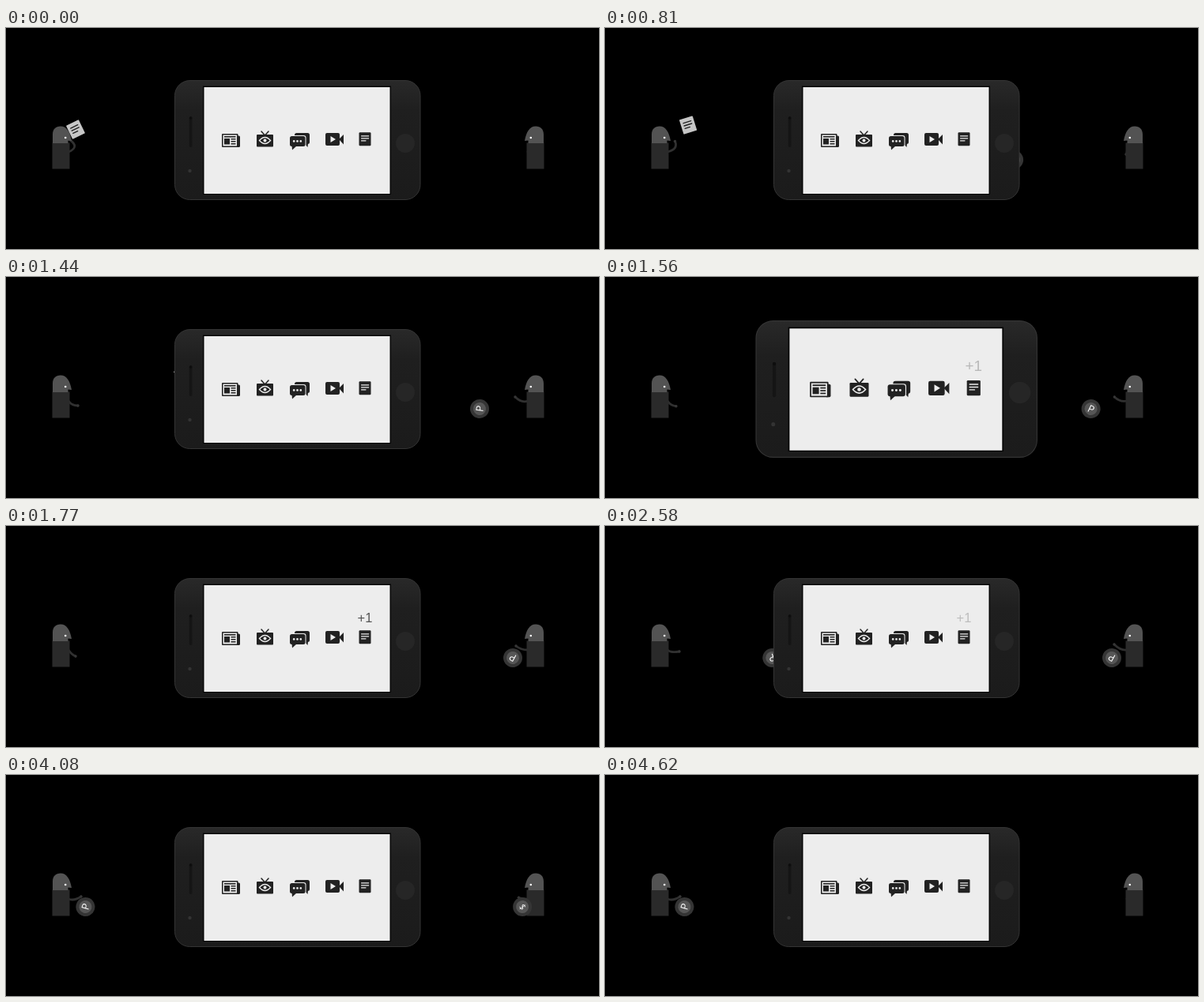
Write an HTML page with a canvas that moves like this. It is 750x280 px and loops after 6990 ms.

```html
<!DOCTYPE html>
<html lang="en">
<head>
<meta charset="utf-8">
<title>Paper for coins</title>
<style>
  html, body { margin: 0; width: 100%; height: 100%; overflow: hidden; background: #000; }
  canvas { display: block; }
</style>
</head>
<body>
<canvas id="stage" width="750" height="280"></canvas>
<script>
const ctx = document.getElementById('stage').getContext('2d');
const LOOP = 6990;
const INK = '#222', SCREEN = '#ededed';
const SANS = '"Liberation Sans", Arial, sans-serif';

const clamp = (v, lo = 0, hi = 1) => Math.min(hi, Math.max(lo, v));
const ramp = (t, from, to) => clamp((t - from) / (to - from));
const rad = deg => deg * Math.PI / 180;

// Keys are [time, ...values], joined by straight interpolation.
function track(t, keys) {
  let i = 0;
  while (i < keys.length - 2 && t > keys[i + 1][0]) i++;
  const [a, b] = [keys[i], keys[i + 1]];
  const k = ramp(t, a[0], b[0]);
  return a.slice(1).map((v, n) => v + (b[n + 1] - v) * k);
}

function rect(x, y, w, h, fill, r = 0) {
  ctx.beginPath();
  ctx.roundRect(x, y, w, h, r);
  ctx.fillStyle = fill;
  ctx.fill();
}

function disc(x, y, r, fill) {
  ctx.beginPath();
  ctx.arc(x, y, r, 0, 2 * Math.PI);
  ctx.fillStyle = fill;
  ctx.fill();
}

function shape(d, fill, stroke, width = 1) {
  const p = new Path2D(d);
  if (fill) { ctx.fillStyle = fill; ctx.fill(p); }
  if (stroke) { ctx.strokeStyle = stroke; ctx.lineWidth = width; ctx.stroke(p); }
}

function placed(x, y, angle, draw) {
  ctx.save();
  ctx.translate(x, y);
  ctx.rotate(rad(angle));
  draw();
  ctx.restore();
}

const leftArm = [
  [720, 94, 151, 80, 141], [900, 92, 156, 97, 146], [1140, 87, 160, 96, 151],
  [1440, 83, 163, 91, 163], [1770, 83, 163, 88, 165], [2160, 83, 163, 88, 165],
  [2580, 83, 161, 94, 159], [3180, 86, 160, 96, 155], [3240, 86, 160, 95, 154]
];
const rightArm = [
  [720, 662, 158, 662, 160], [1140, 655, 161, 648, 160], [1440, 652, 160, 644, 152],
  [1770, 651, 157, 645, 152], [2580, 652, 158, 644, 150], [3180, 653, 158, 645, 154],
  [4020, 653, 158, 645, 154], [4320, 662, 158, 662, 160]
];

function arm(baseX, [cx, cy, x, y]) {
  ctx.lineCap = 'round';
  shape(`M${baseX} 157Q${cx} ${cy} ${x} ${y}`, null, '#303030', 2.8);
  disc(x, y, 1.7, '#363636');
}

function person() {
  rect(58.5, 145.5, 22, 33, '#2a2a2a');
  shape('M59 146V135C59 128 63 124.5 69 124.5C77 124.5 81 132 83 143L78.5 142.5V146Z', '#535353');
  disc(75.2, 139, 1.3, '#fff');
}

function people(t) {
  arm(79, track(t, leftArm));
  person();
  arm(660, track(t, rightArm));
  ctx.save();
  ctx.translate(739, 0);
  ctx.scale(-1, 1);
  person();
  ctx.restore();
}

function paper(t) {
  if (t > 1530) return;
  const s = Math.max(0, t - 720);
  const y = 128.5 - 0.0682 * s + 7.7e-5 * s * s;
  placed(88 + 0.19 * s, y, -26 + 0.095 * s, () => {
    rect(-8.8, -9.5, 17.6, 19, '#c6c6c6', 0.8);
    shape('M-5-4H5M-5-.5H5M-5 3H1.5', null, '#222', 1.4);
  });
}

function coin(x, angle, mark, alpha = 1) {
  placed(x, 167, angle, () => {
    disc(0, 0, 12, '#353535');
    disc(0, 0, 8, '#565656');
    ctx.globalAlpha = alpha;
    ctx.fillStyle = '#fff';
    ctx.font = `${mark === 'P' ? 13 : 11}px "Open Sans", ${SANS}`;
    ctx.textAlign = 'center';
    ctx.textBaseline = 'alphabetic';
    ctx.fillText(mark, 0.3, mark === 'P' ? 4.8 : 4);
  });
}

function coins(t) {
  if (t >= 720 && t < 3400) {
    const s = Math.min(t, 1763) - 1140;
    coin(560 + 0.13 * s, 8 + 0.9 * s, 'P', 1 - ramp(t, 2760, 3060));
  } else if (t >= 3400 && t < 4620) {
    const s = Math.max(0, t - 4020);
    coin(641 + 0.202 * s, 0.9 * s, '$', ramp(t, 3390, 3570));
  }
  if (t > 2300) {
    const s = Math.min(t, 3240) - 3180;
    coin(110.5 - 0.168 * s, -20 - 0.9 * s, 'P');
  }
}

function newsIcon() {
  rect(290, 136.5, 6, 14.5, INK, 1.5);
  rect(273, 134, 20.5, 17, INK, 1);
  rect(274.5, 135.5, 17.5, 14, SCREEN);
  rect(276, 137, 14.5, 1.6, INK);
  rect(276, 140, 7, 7.5, INK);
  for (const y of [140, 143, 146]) rect(284.5, y, 6, 1.5, INK);
}

function tvIcon() {
  rect(317, 135, 21, 15.5, INK, 1);
  shape('M323 131L327.5 136L332 131', null, INK, 1.5);
  shape('M320.5 142.5Q327.5 134.5 334.5 142.5Q327.5 150.5 320.5 142.5Z', null, SCREEN, 1.4);
  disc(327.5, 142.5, 2, SCREEN);
}

function chatIcon() {
  rect(365, 133, 19, 14, INK, 2.5);
  shape('M377 146H382L381.5 151Z', INK);
  rect(358, 136, 21.5, 15, SCREEN, 3);
  rect(359, 137, 19.5, 13, INK, 2.5);
  shape('M361.5 149H368L362 154.5Z', INK);
  for (const x of [364.2, 368.5, 372.8]) disc(x, 143.4, 1.3, SCREEN);
}

function videoIcon() {
  rect(404, 133, 18, 16, INK, 2);
  shape('M421 141L427 135V147.5Z', INK);
  shape('M410.5 137V145L417 141Z', SCREEN);
}

function noteIcon() {
  rect(446.5, 132.3, 15, 17, INK, 1.2);
  shape('M449.5 136.8H458.7M449.5 139.8H458.7M449.5 142.8H455', null, SCREEN, 1.2);
}

function plusOne(t) {
  const alpha = ramp(t, 1500, 1680) * (1 - ramp(t, 1740, 2940));
  if (!alpha) return;
  ctx.save();
  ctx.globalAlpha = alpha;
  ctx.fillStyle = '#505050';
  ctx.font = `16.5px ${SANS}`;
  ctx.textAlign = 'center';
  ctx.textBaseline = 'alphabetic';
  ctx.fillText('+1', 454, 121.5);
  ctx.restore();
}

const shell = ctx.createLinearGradient(0, 66, 0, 218);
shell.addColorStop(0, '#292929');
shell.addColorStop(0.25, '#1f1f1f');
shell.addColorStop(1, '#1b1b1b');

function phone(t) {
  const size = 1 + 0.18 * Math.sin(Math.PI * ramp(t, 1480, 1750));
  ctx.save();
  ctx.translate(369, 142);
  ctx.scale(size, size);
  ctx.translate(-369, -142);

  rect(213.5, 66.5, 310.5, 151, shell, 19);
  ctx.strokeStyle = '#343434';
  ctx.lineWidth = 1;
  ctx.stroke();
  rect(231.8, 112, 3.6, 39, '#151515', 1.8);
  disc(233.6, 114, 1.8, '#0e0e0e');
  disc(232.5, 181, 2.2, '#333');
  disc(505, 146, 12, '#262626');
  rect(249, 73.5, 238, 137.5, '#050505');
  rect(250.5, 75, 235, 135, SCREEN);

  newsIcon();
  tvIcon();
  chatIcon();
  videoIcon();
  noteIcon();
  plusOne(t);
  ctx.restore();
}

function render(t) {
  ctx.fillStyle = '#000';
  ctx.fillRect(0, 0, 750, 280);
  people(t);
  paper(t);
  coins(t);
  phone(t);
}

let start;
function tick(now) {
  start ??= now;
  render((now - start) % LOOP);
  requestAnimationFrame(tick);
}
render(0);
requestAnimationFrame(tick);
</script>
</body>
</html>
```
